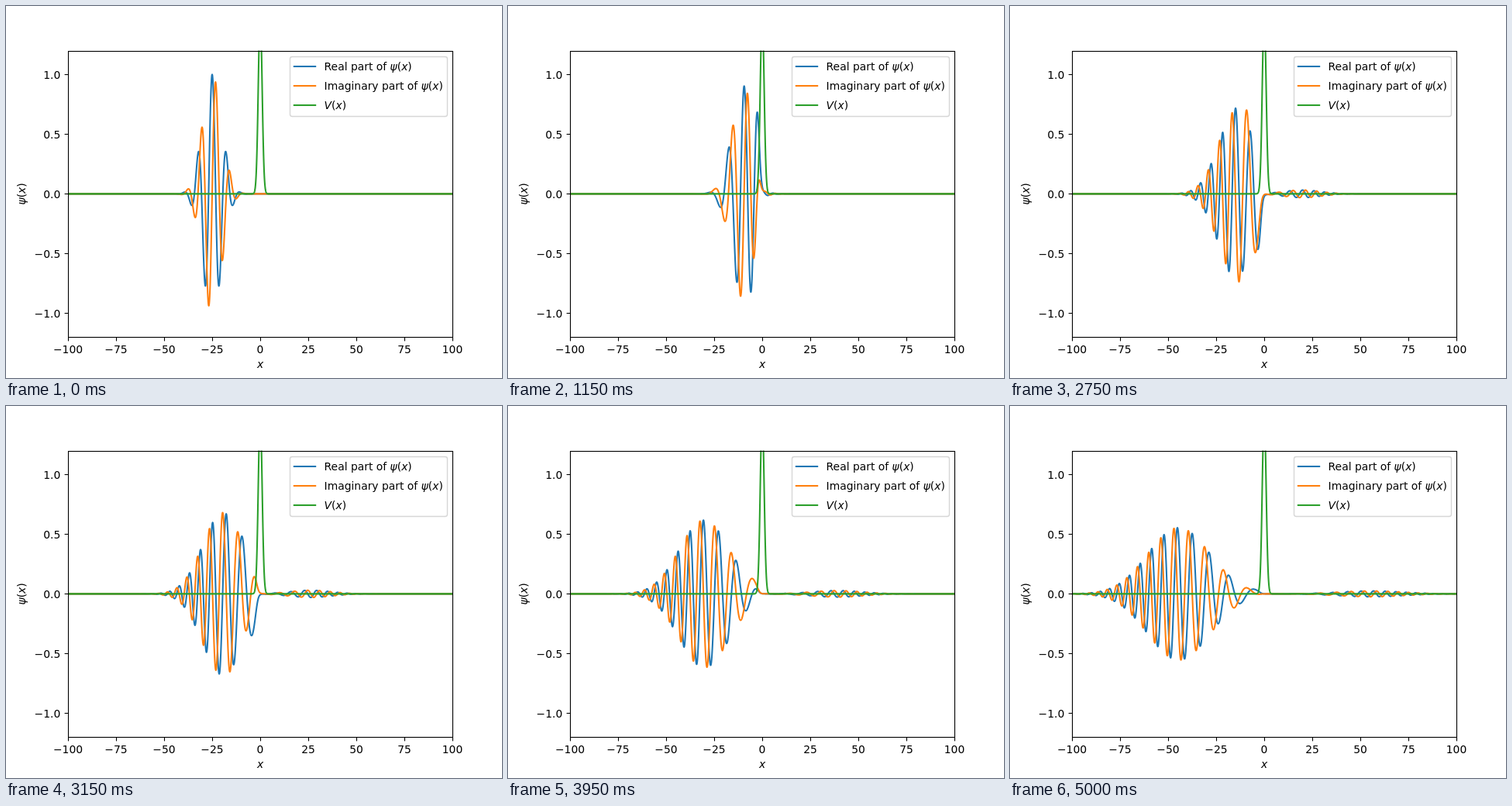
An HTML page with a canvas that plays this animation: 640x480 px, repeating every 5050 ms.

```html
<!DOCTYPE html>
<html lang="en">
<head>
<meta charset="utf-8">
<title>Wave packet at a Gaussian barrier</title>
<style>
  html, body { margin: 0; width: 100%; height: 100%; overflow: hidden; background: #fff; }
  canvas { display: block; }
</style>
</head>
<body>
<canvas id="plot" width="640" height="480"></canvas>
<script>
const ctx = document.getElementById('plot').getContext('2d');

// Physics (hbar = m = 1)
const FRAMES = 101, FRAME_MS = 50, FRAME_DT = 0.8;
const STEPS = 16, DT = FRAME_DT / STEPS;
const DX = 0.05, N = 4001;
const START = -25, SIGMA = 5, K0 = 0.85;
const gridX = j => -100 + j * DX;
const barrier = x => 1.5 * Math.exp(-x * x / 2);

// Crank-Nicolson: solve (1 + i H dt/2) phi = psi, then psi <- 2 phi - psi
function simulate() {
  const array = () => new Float64Array(N);
  const re = array(), im = array(), dRe = array(), dIm = array();
  const mRe = array(), mIm = array(), cRe = array(), cIm = array();
  const r = DT / (4 * DX * DX);

  for (let j = 0; j < N; j++) {
    const x = gridX(j), d = x - START;
    const envelope = Math.exp(-d * d / (2 * SIGMA * SIGMA));
    re[j] = envelope * Math.cos(K0 * d);
    im[j] = envelope * Math.sin(K0 * d);
    const a = 1 - (j ? r * cIm[j - 1] : 0);
    const b = 2 * r + barrier(x) * DT / 2 + (j ? r * cRe[j - 1] : 0);
    const norm = a * a + b * b;
    mRe[j] = a / norm;
    mIm[j] = -b / norm;
    cRe[j] = r * mIm[j];
    cIm[j] = -r * mRe[j];
  }

  function step() {
    let pr = 0, pi = 0;
    for (let j = 0; j < N; j++) {
      const a = re[j] - r * pi, b = im[j] + r * pr;
      dRe[j] = pr = a * mRe[j] - b * mIm[j];
      dIm[j] = pi = a * mIm[j] + b * mRe[j];
    }
    pr = pi = 0;
    for (let j = N - 1; j >= 0; j--) {
      const a = dRe[j] - cRe[j] * pr + cIm[j] * pi;
      const b = dIm[j] - cRe[j] * pi - cIm[j] * pr;
      pr = a;
      pi = b;
      re[j] = 2 * pr - re[j];
      im[j] = 2 * pi - im[j];
    }
  }

  const states = [];
  for (let n = 0; n < FRAMES; n++) {
    states.push({ re: Float32Array.from(re), im: Float32Array.from(im) });
    for (let s = 0; s < STEPS; s++) step();
  }
  return states;
}

// Plot
const BLUE = '#1f77b4', ORANGE = '#ff7f0e', GREEN = '#2ca02c';
const LEFT = 80, RIGHT = 576, TOP = 57.6, BOTTOM = 427.2;
const FONT = '13.889px "DejaVu Sans", sans-serif';
const toX = x => 328 + 2.48 * x;
const toY = y => 242.4 - 154 * y;
const snap = v => Math.floor(v) + 0.5;

function line(x1, y1, x2, y2) {
  ctx.beginPath();
  ctx.moveTo(x1, y1);
  ctx.lineTo(x2, y2);
  ctx.stroke();
}

// Parts between asterisks are set in italics; align: 0 left, 0.5 centre, 1 right
function label(text, x, y, align = 0) {
  const runs = text.split('*').map((part, i) => {
    const font = (i % 2 ? 'italic ' : '') + FONT;
    ctx.font = font;
    return { part, font, width: ctx.measureText(part).width };
  });
  x -= align * runs.reduce((sum, run) => sum + run.width, 0);
  ctx.fillStyle = '#000';
  for (const { part, font, width } of runs) {
    ctx.font = font;
    ctx.fillText(part, x, y);
    x += width;
  }
}

function curve(values, color) {
  ctx.strokeStyle = color;
  ctx.beginPath();
  for (let j = 0; j < N; j++) ctx.lineTo(toX(gridX(j)), toY(values[j]));
  ctx.stroke();
}

function drawAxes() {
  ctx.strokeStyle = '#000';
  ctx.lineWidth = 1.11;
  ctx.strokeRect(80.5, 58.5, 496, 369);
  const minus = s => s.replace('-', '\u2212');
  for (let v = -100; v <= 100; v += 25) {
    const x = toX(v);
    line(snap(x), 427.5, snap(x), 432.4);
    label(minus(String(v)), x, 448, 0.5);
  }
  for (let v = -1; v <= 1; v += 0.5) {
    const y = toY(v);
    line(75.6, snap(y), 80.5, snap(y));
    label(minus(v.toFixed(1)), 70.3, y + 5.2, 1);
  }
  label('*x*', 328, 467, 0.5);
  ctx.save();
  ctx.translate(25, 242.4);
  ctx.rotate(-Math.PI / 2);
  label('*ψ*(*x*)', 0, 0, 0.5);
  ctx.restore();
}

function drawLegend() {
  ctx.beginPath();
  ctx.roundRect(366.5, 65.5, 203, 77, 2.8);
  ctx.fillStyle = 'rgba(255,255,255,0.8)';
  ctx.fill();
  ctx.strokeStyle = 'rgba(204,204,204,0.8)';
  ctx.lineWidth = 1.39;
  ctx.stroke();
  const entries = [
    ['Real part of *ψ*(*x*)', BLUE],
    ['Imaginary part of *ψ*(*x*)', ORANGE],
    ['*V*(*x*)', GREEN],
  ];
  ctx.lineWidth = 2.08;
  entries.forEach(([text, color], i) => {
    const y = 78 + 25 * i;
    ctx.strokeStyle = color;
    line(370.8, y, 400.2, y);
    label(text, 410.6, y + 5);
  });
}

const states = simulate();
const potential = Float64Array.from({ length: N }, (_, j) => barrier(gridX(j)));

function draw({ re, im }) {
  ctx.fillStyle = '#fff';
  ctx.fillRect(0, 0, 640, 480);
  ctx.save();
  ctx.beginPath();
  ctx.rect(LEFT, TOP, RIGHT - LEFT, BOTTOM - TOP);
  ctx.clip();
  ctx.lineWidth = 2.08;
  ctx.lineJoin = 'round';
  curve(re, BLUE);
  curve(im, ORANGE);
  curve(potential, GREEN);
  ctx.restore();
  drawAxes();
  drawLegend();
}

let shown = -1;
function tick() {
  const index = Math.floor(performance.now() / FRAME_MS - origin) % FRAMES;
  if (index !== shown) draw(states[shown = index]);
  requestAnimationFrame(tick);
}
const origin = performance.now() / FRAME_MS;
tick();
</script>
</body>
</html>
```
